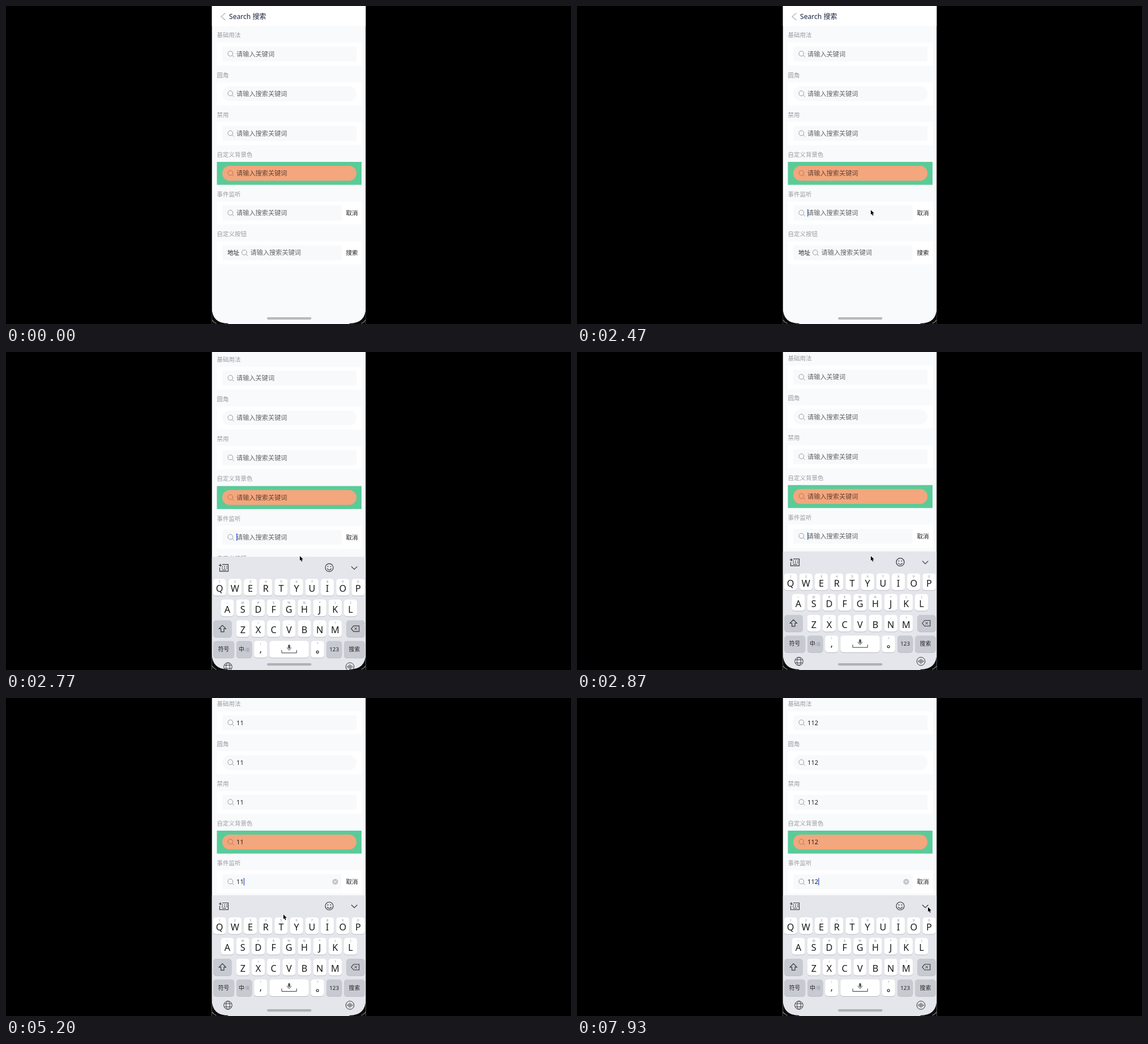
Animation of 998x561 px, one loop 8000 ms. Source, as an HTML page with a canvas:

```html
<!DOCTYPE html>
<html lang="zh">
<head>
<meta charset="utf-8">
<title>Search</title>
<style>
html, body { margin: 0; width: 100%; height: 100%; overflow: hidden; background: #000; }
canvas { display: block; width: 100vw; height: 100vh; }
</style>
</head>
<body>
<canvas id="stage"></canvas>
<script>
const W = 998, H = 561, LOOP = 8000;
const LEFT = 363.5, RIGHT = 635.5, CORNER = 29;
const FONT = '"Noto Sans", "Noto Sans CJK SC", "Noto Sans CJK", sans-serif';
const KEYBOARD_TOP = 348, PAGE_SHIFT = 41, OPEN_AT = 2480;

const canvas = document.getElementById('stage');
const ctx = canvas.getContext('2d');
const dpr = window.devicePixelRatio || 1;
canvas.width = Math.round(W * dpr);
canvas.height = Math.round(H * dpr);

const rows = [
  { label: '基础用法', hint: '请输入关键词' },
  { label: '圆角', hint: '请输入搜索关键词', radius: 13 },
  { label: '禁用', hint: '请输入搜索关键词' },
  { label: '自定义背景色', hint: '请输入搜索关键词', radius: 13, card: '#5acb98', field: '#f4a67d' },
  { label: '事件监听', hint: '请输入搜索关键词', button: '取消', active: true },
  { label: '自定义按钮', hint: '请输入搜索关键词', button: '搜索', prefix: '地址' }
];

// Typed value and the moment the caret restarts its blink.
const edits = [[2470, ''], [4530, '1'], [5170, '11'], [5870, '112']];

// Pointer tip: time, x, y
const pointer = [
  [1530, 634, 367], [2170, 519, 360], [3470, 519, 360], [3770, 505, 371],
  [4170, 505, 371], [4330, 490, 382], [6370, 490, 382], [7170, 594, 376],
  [7300, 594, 376], [7930, 620, 369]
];

function text(str, x, y, size, color, opt = {}) {
  ctx.font = `${opt.weight || 400} ${size}px ${FONT}`;
  ctx.textAlign = opt.align || 'left';
  ctx.textBaseline = 'alphabetic';
  ctx.fillStyle = color;
  ctx.fillText(str, x, y + size * 0.37);
}

function box(x, y, w, h, r, color) {
  ctx.fillStyle = color;
  ctx.beginPath();
  ctx.roundRect(x, y, w, h, r);
  ctx.fill();
}

function line(points, color, width = 1, close = false) {
  ctx.strokeStyle = color;
  ctx.lineWidth = width;
  ctx.beginPath();
  points.forEach(([x, y], i) => i ? ctx.lineTo(x, y) : ctx.moveTo(x, y));
  if (close) ctx.closePath();
  ctx.stroke();
}

function ring(x, y, rx, color, width = 1, ry = rx, from = 0, to = Math.PI * 2) {
  ctx.strokeStyle = color;
  ctx.lineWidth = width;
  ctx.beginPath();
  ctx.ellipse(x, y, rx, ry, 0, from, to);
  ctx.stroke();
}

function disc(x, y, r, color) {
  ctx.fillStyle = color;
  ctx.beginPath();
  ctx.arc(x, y, r, 0, Math.PI * 2);
  ctx.fill();
}

// Critically damped spring
function openness(t) {
  if (t < OPEN_AT) return 0;
  const s = (t - OPEN_AT) * 0.01535;
  return 1 - (1 + s) * Math.exp(-s);
}

function currentEdit(t) {
  return edits.filter(e => e[0] <= t).pop();
}

function drawRow(row, i, t, edit) {
  const y = 84.5 + i * 70.15;
  const value = edit ? edit[1] : '';
  const right = row.button ? 593 : 619;
  text(row.label, 372.5, y - 33, 10.5, '#999b9f');
  box(372.5, y - 20, 255.5, 40.5, 0, row.card || '#ffffff');
  box(382, y - 13, right - 382, 26.3, row.radius || 2, row.field || '#f8f9fb');

  let x = 391;
  if (row.prefix) {
    text(row.prefix, x, y, 10.6, '#222');
    x += 24.5;
  }
  const iconColor = row.field ? 'rgba(120,80,60,.5)' : '#97999c';
  ring(x + 5.3, y - 0.5, 4.4, iconColor);
  line([[x + 8.5, y + 2.7], [x + 11.7, y + 5.6]], iconColor);

  // The last field keeps its own value.
  const shown = row.prefix ? '' : value;
  if (shown) text(shown, x + 16, y, 11.2, '#222');
  else text(row.hint, x + 16, y, 11.2, 'rgba(0,0,0,.6)');

  if (row.active && edit) {
    if (Math.floor((t - edit[0]) / 500) % 2 === 0) {
      box(x + 16 + value.length * 6.4, y - 6.6, 1.3, 13, 0, '#2b59d0');
    }
    if (value) {
      disc(581.5, y, 5.2, '#c3c5c9');
      line([[579.6, y - 1.9], [583.4, y + 1.9]], '#fff');
      line([[583.4, y - 1.9], [579.6, y + 1.9]], '#fff');
    }
  }
  if (row.button) text(row.button, 600.5, y, 10.6, '#222');
}

function drawPage(t, shift) {
  box(LEFT, 0, RIGHT - LEFT, H, 0, '#f9fafc');
  ctx.save();
  ctx.translate(0, -shift);
  box(LEFT, 0, RIGHT - LEFT, 35.5, 0, '#fff');
  line([[387.5, 12.5], [380, 18.7], [387.5, 25]], '#a9abb0', 1.1);
  text('Search 搜索', 394, 18.8, 12.1, '#17233d', { weight: 500 });
  const edit = currentEdit(t);
  rows.forEach((row, i) => drawRow(row, i, t, edit));
  ctx.restore();
}

function key(x, y, w, dark) {
  box(x, y + 1, w, 29.5, 5, '#b9bcc4');
  box(x, y, w, 29.5, 5, dark ? '#c7cad1' : '#fff');
}

function letterRow(letters, hints, first, y) {
  [...letters].forEach((ch, i) => {
    const x = first + i * 27.2;
    key(x - 11.6, y, 23.2);
    text(hints[i], x, y + 4.8, 6, '#8b8d92', { align: 'center' });
    text(ch, x, y + 17, 16.3, '#1a1a1a', { align: 'center' });
  });
}

function toolbar(c) {
  const dots = [380.5, 384.5, 388.5];
  line([[382, 361.5], [392.5, 361.5], [392.5, 373.5], [377.5, 373.5], [377.5, 367]], c, 1.2);
  line([[376, 363], [381, 363]], c, 1.2);
  line([[378.5, 360.5], [378.5, 365.5]], c, 1.2);
  dots.forEach(x => {
    box(x + 0.8, 364.3, 1.6, 1.5, 0, c);
    box(x + 0.8, 367.3, 1.6, 1.5, 0, c);
  });
  line([[381.5, 371], [389, 371]], c);
  ring(571, 367, 7, c, 1.2);
  disc(568.5, 365, 0.9, c);
  disc(573.5, 365, 0.9, c);
  ring(571, 367.8, 3.5, c, 1.1, 3.3, 0.15, Math.PI - 0.15);
  line([[610, 365], [615.2, 370], [620.4, 365]], c, 1.2);
}

function bottomIcons(c) {
  ring(392, 542, 7.3, c);
  ring(392, 542, 3.3, c, 0.9, 7.3);
  line([[385.5, 539.2], [398.5, 539.2]], c, 0.9);
  line([[385.5, 544.8], [398.5, 544.8]], c, 0.9);
  ring(607.5, 542, 7.3, c);
  [1.5, 3, 4.3, 3, 1.5].forEach((h, i) => {
    const x = 603.1 + i * 2.2;
    line([[x, 542 - h], [x, 542 + h]], c);
  });
}

function drawKeyboard(offset) {
  const ink = '#35373b';
  ctx.save();
  ctx.translate(0, offset);
  box(LEFT, KEYBOARD_TOP, RIGHT - LEFT, H - KEYBOARD_TOP, 0, '#e4e6eb');
  toolbar(ink);
  letterRow('QWERTYUIOP', '1234567890', 377.2, 387);
  letterRow('ASDFGHJKL', '~@#$%&*()', 391, 423.3);
  letterRow('ZXCVBNM', "'/-_:;?", 418.3, 460);

  key(366.2, 460, 32.5, true);
  line([[382.3, 468.7], [388.3, 474.8], [385, 474.8], [385, 480.2],
        [379.6, 480.2], [379.6, 474.8], [376.3, 474.8]], ink, 1.2, true);
  key(601.2, 460, 32.5, true);
  line([[609.8, 474.8], [614, 469.8], [623.7, 469.8], [623.7, 479.8], [614, 479.8]], ink, 1.1, true);
  line([[615.5, 472.5], [620, 477]], ink);
  line([[620, 472.5], [615.5, 477]], ink);

  const y = 496.5, mid = { align: 'center' };
  key(366.2, y, 37, true);
  text('符号', 384.6, 511, 9.8, '#222', mid);
  key(407, y, 27.5, true);
  text('中', 416, 511, 10, '#222', mid);
  text('/英', 425.8, 512, 6.5, '#8b8d92', mid);
  key(438.2, y, 23.2);
  text('!', 449.8, 501, 6, '#8b8d92', mid);
  text(',', 449.8, 510.5, 16, '#1a1a1a', mid);
  key(465.3, y, 69.5);
  box(498.2, 503, 3.8, 7, 1.9, '#55575b');
  ring(500.1, 507.5, 3.7, '#55575b', 0.9, 4, 0, Math.PI);
  line([[500.1, 511.5], [500.1, 513.5]], '#55575b', 0.9);
  line([[487, 512.5], [487, 517.5], [513.3, 517.5], [513.3, 512.5]], ink);
  key(538.6, y, 23.2);
  text('?', 550.2, 500.8, 6, '#8b8d92', mid);
  ring(550.2, 516, 2, '#1a1a1a', 1.1);
  key(566, y, 27.3, true);
  text('123', 579.6, 511, 9.8, '#222', mid);
  key(597, y, 36.8, true);
  text('搜索', 615.4, 511, 9.8, '#222', mid);
  bottomIcons(ink);
  ctx.restore();
}

function drawCorner(x, dir) {
  const cx = x + dir * CORNER, cy = 560 - CORNER;
  ctx.fillStyle = '#0b0b0b';
  ctx.beginPath();
  ctx.moveTo(x, cy);
  ctx.quadraticCurveTo(x, 560, cx, 560);
  ctx.lineTo(cx, H);
  ctx.lineTo(x, H);
  ctx.closePath();
  ctx.fill();
  line([[x + dir * 0.5, 554], [x + dir * 3.5, 557.5], [x + dir * 8, 560]], '#77776f', 1.4);
}

function drawPointer(t) {
  if (t < pointer[0][0]) return;
  let i = pointer.findIndex(p => p[0] > t);
  if (i < 0) i = pointer.length;
  const a = pointer[i - 1], b = pointer[i] || a;
  const u = b === a ? 0 : (t - a[0]) / (b[0] - a[0]);
  const e = i === 1 ? 1 - (1 - u) ** 2 : u * u * (3 - 2 * u);
  ctx.save();
  ctx.translate(a[1] + (b[1] - a[1]) * e, a[2] + (b[2] - a[2]) * e);
  const shape = [[0, 0], [0, 8], [1.8, 6.5], [3.2, 9.8], [4.7, 9.1], [3.3, 6], [5.8, 5.8]];
  line(shape, 'rgba(255,255,255,.8)', 1.2, true);
  ctx.fillStyle = '#000';
  ctx.fill();
  ctx.restore();
}

function draw(t) {
  ctx.setTransform(dpr, 0, 0, dpr, 0, 0);
  box(0, 0, W, H, 0, '#000');
  const open = openness(t);
  ctx.save();
  ctx.beginPath();
  ctx.rect(LEFT, 0, RIGHT - LEFT, H);
  ctx.clip();
  drawPage(t, PAGE_SHIFT * open);
  if (open > 0) drawKeyboard((H - KEYBOARD_TOP) * (1 - open));
  box(461, 549, 78.5, 4.2, 2.1, open > 0.3 ? '#b0b1b4' : '#b9b9ba');
  drawCorner(LEFT, 1);
  drawCorner(RIGHT, -1);
  drawPointer(t);
  ctx.restore();
}

function tick() {
  draw(performance.now() % LOOP);
  requestAnimationFrame(tick);
}
tick();
</script>
</body>
</html>
```
